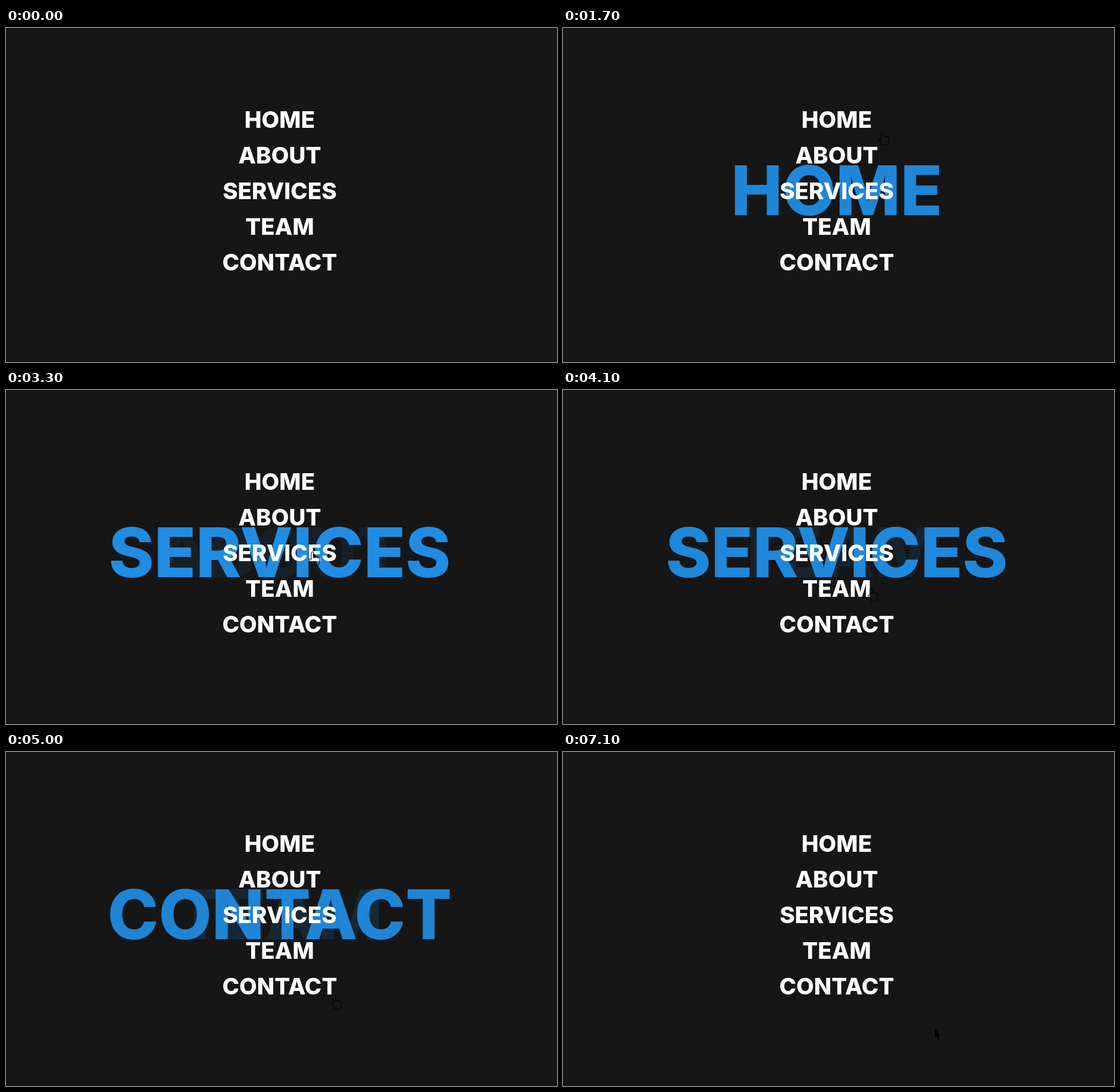
An HTML page for the animation above (7.2 s loop, 926 by 562 pixels).

```html
<!DOCTYPE html>
<html lang="en">
<head>
<meta charset="utf-8">
<title>Menu</title>
<style>
  html, body { margin: 0; width: 100%; height: 100%; overflow: hidden; background: #161616; }
  svg { display: block; width: 926px; height: 562px; }
  text {
    font-family: Inter, "Open Sans", sans-serif;
    font-weight: 800;
    font-optical-sizing: none;
    text-anchor: middle;
  }
  #back text { font-size: 115.5px; fill: #2196f3; opacity: 0; }
  #menu text { font-size: 38.5px; fill: #fff; }
  #hand { fill: none; stroke: #000; stroke-linejoin: round; stroke-linecap: round; }
</style>
</head>
<body>
<svg viewBox="0 0 926 562">
  <g id="back"></g>
  <g id="menu"></g>
  <g id="cursor">
    <path id="arrow" d="M0 0V15L3 12L6 18L8 17L6 11H10Z"/>
    <path id="hand" d="M-2 13V2Q0-2 2 2V9V7Q5 6 6 10V8Q9 7 9 11V9Q12 9 12 12V16L10 23H0V21L-5 14Q-6 10-2 13"/>
  </g>
</svg>
<script>
const LOOP = 7200, STEP = 100, FADE = 600, LEAVE = 5400;

const items = [
  { label: "HOME", on: 1345 },
  { label: "ABOUT", on: 1760 },
  { label: "SERVICES", on: 2900 },
  { label: "TEAM", on: 4035 },
  { label: "CONTACT", on: 4660 }
];

// Places the pointer passes; it moves evenly between them
const stops = [
  { t: 100, x: 856, y: 526 },
  { t: 1700, x: 536, y: 174 },
  { t: 2600, x: 513, y: 218 },
  { t: 4100, x: 518, y: 333 },
  { t: 5000, x: 552, y: 410 },
  { t: 5750, x: 625, y: 466 }
];

const $ = id => document.getElementById(id);

function addText(parent, label, y) {
  const el = document.createElementNS("http://www.w3.org/2000/svg", "text");
  el.setAttribute("x", 460);
  el.setAttribute("y", y);
  el.textContent = label;
  return $(parent).appendChild(el);
}

items.forEach((item, i) => {
  item.off = items[i + 1]?.on ?? LEAVE;
  item.ghost = addText("back", item.label, 315);
  addText("menu", item.label, 168 + 60 * i);
});

// The CSS "ease" curve, cubic-bezier(.25, .1, .25, 1), solved by bisection
function ease(x) {
  if (x <= 0) return 0;
  if (x >= 1) return 1;
  const curve = (a, b, s) => 3 * a * s * (1 - s) ** 2 + 3 * b * s * s * (1 - s) + s ** 3;
  let lo = 0, hi = 1;
  for (let i = 0; i < 24; i++) {
    const mid = (lo + hi) / 2;
    if (curve(0.25, 0.25, mid) < x) lo = mid; else hi = mid;
  }
  return curve(0.1, 1, lo);
}

const fade = (t, { on, off }) => ease((t - on) / FADE) * (1 - ease((t - off) / FADE));

function pointer(t) {
  const i = stops.findIndex(s => s.t > t);
  if (i < 0) return stops.at(-1);
  const b = stops[i], a = stops[i - 1] ?? b;
  const k = a === b ? 0 : (t - a.t) / (b.t - a.t);
  return { x: a.x + (b.x - a.x) * k, y: a.y + (b.y - a.y) * k };
}

function show(id, on) {
  $(id).style.display = on ? "" : "none";
}

function draw(now) {
  const t = Math.floor((now % LOOP) / STEP) * STEP;
  for (const item of items) item.ghost.style.opacity = fade(t, item);

  const hover = t >= items[0].on && t < LEAVE;
  show("cursor", t >= stops[0].t);
  show("hand", hover);
  show("arrow", !hover);
  const { x, y } = pointer(t);
  $("cursor").setAttribute("transform", `translate(${Math.round(x)} ${Math.round(y)})`);
}

const start = performance.now();
function tick() {
  draw(performance.now() - start);
  requestAnimationFrame(tick);
}
tick();
</script>
</body>
</html>
```
